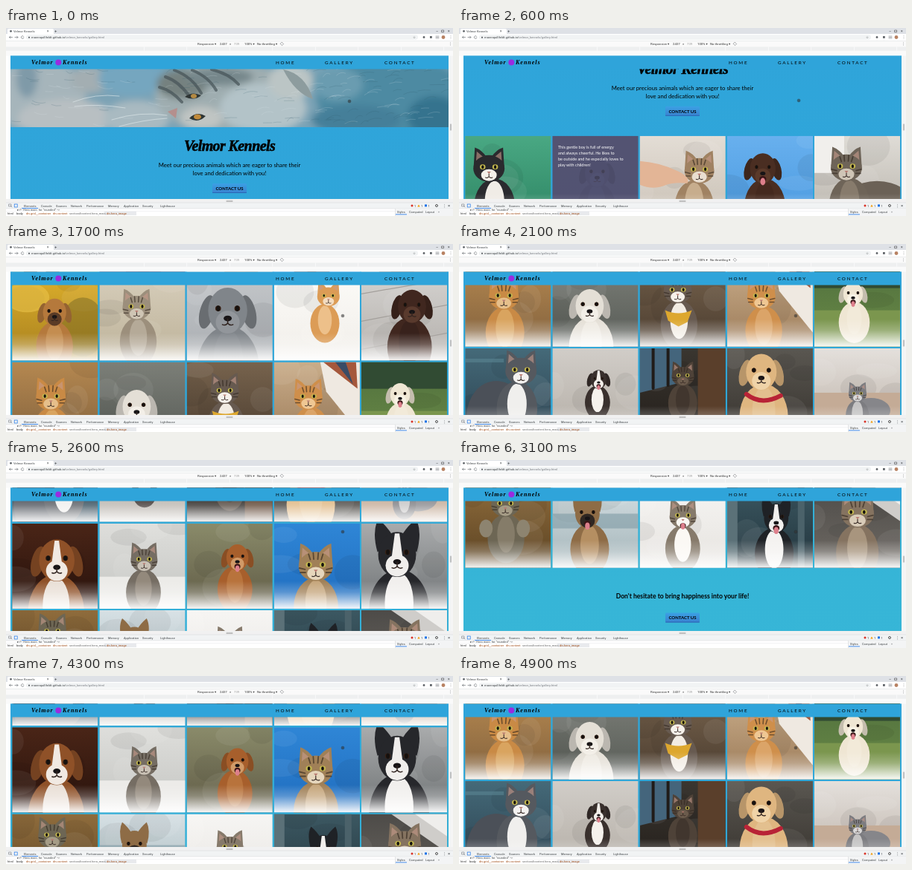
An HTML page for the animation above (5 s loop, 600 px wide and 254 px high).

```html
<!DOCTYPE html>
<html lang="en">
<head>
<meta charset="utf-8">
<title>Velmor Kennels</title>
<style>
html, body { margin: 0; width: 100%; height: 100%; overflow: hidden; background: #fff; }
svg { display: block; width: 600px; height: 254px; }
text { font-family: Lato, sans-serif; white-space: pre; }
.ui { font-family: Roboto, sans-serif; fill: #3c4043; }
.brand { font-family: "Liberation Serif", serif; font-weight: 700; font-style: italic; }
</style>
</head>
<body>
<svg id="stage" viewBox="0 0 600 254"></svg>
<script>
const LOOP = 5000, STEP = 100;
const TOP = 250, PITCH = 117.3, SIZE = 115.2;

// time, scroll offset
const SCROLL = [[0, 0], [400, 80], [500, 80], [1100, 225], [1200, 248], [1300, 257], [1500, 257],
  [2100, 461], [3100, 806], [3500, 830], [3700, 830], [3800, 806], [3900, 776], [4300, 650], [4900, 460]];

// kind letters: c cat, d drop-eared dog, p prick-eared dog, t stripes, b blaze, o open mouth
// then: backdrop top, backdrop bottom, fur, muzzle, chest, x, y, radius
const PETS = `
c 49a883 2f8664 2a2a2e f3f0ea f0ece6 32 44 21
d 5b5c7c 57587a 4c4d6b 55567a 55567a 60 50 20
ct e3ddd5 c9c0b4 a08262 e9ded0 c7ad8d 80 47 20
do 68b0ee 4b9ae0 4a2e22 5b3a2a 44291e 48 44 21
ct dfdcd6 b9b4ac 6e6458 cfc5b6 877b6c 43 43 21
d dcae2b a67f1f b5793c 5a3b26 c48d50 57 50 19
ct d6cdba bdb299 9c8f7c cfc5b4 b5aa98 50 44 19
d c3c6c9 a9adb1 80858a 92969b 858a8f 55 48 32
c fbfaf7 f1eee9 dc9c56 f3dcc0 edc08a 73 29 15
d d3d1ce b3afab 40271f 593a2d 38221c 68 42 23
ct b58850 81613d c98a45 e6bf8b d9a45f 52 48 20
d 7c7f78 565a55 e4dfd6 f3efe8 eeeae2 50 60 23
ct 77634d 4a3c2f 675a50 f6f1ea f2ece3 51 40 19
ct c9ad8a 9b7a58 cf8f4b efc793 dba468 46 48 19
do 50703e 6a8a46 efe6d3 f8f2e4 f2ead9 52 44 16
c 456a79 2c4250 55595f f3f1ef f0efed 75 31 21
dbo d1cdc8 b5afa7 39302d f3efea f5f1ec 62 42 13
ct 3a3630 241f1b 4e4238 6b5b4c 41362e 58 38 15
d 5a5751 38342f dfb680 efd3a8 e3c08f 46 32 25
ct e4e0dc bdb2a8 7c7c80 d9d8d8 c5c4c4 58 62 12
db 4a2517 28120c 8f5128 f1e9e2 e9dfd6 60 50 29
ct dededb c4c5c2 756d63 c9c1b5 93897c 60 50 18
do 8a8b6a 5f5a45 a75f2c d09a68 b8733c 68 46 18
ct 2f86d6 1f6cbe a08057 e6d6bc c5a57b 56 58 23
pb a9abac 6f7375 26272b f0eeec f1efed 48 42 31
ct 8f6c3c 5a4222 6d6654 a59c86 857c69 54 30 19
po d6e0e4 a3b4b8 8e6c46 2f2722 b58f62 47 42 20
cto f6f5f3 e6e3df 867a6b f9f6f1 fbf8f4 58 46 18
pbo 3c5862 22343c 1f2226 f1efed f4f2f0 66 48 20
ct 4d4b48 6f6a64 857360 d8cbb8 a8957e 58 42 22`.trim().split('\n');

const el = (n, a, kids = '') =>
  `<${n} ${Object.entries(a).map(([k, v]) => `${k}="${v}"`).join(' ')}>${kids}</${n}>`;
const rect = (x, y, width, height, fill, more) => el('rect', { x, y, width, height, fill, ...more });
const oval = (cx, cy, rx, ry, fill, more) => el('ellipse', { cx, cy, rx, ry, fill, ...more });
const path = (d, fill, more) => el('path', { d, fill, ...more });
const line = (d, stroke, w = 1, more) =>
  path(d, 'none', { stroke, 'stroke-width': w, 'stroke-linecap': 'round', ...more });
const text = (x, y, size, s, more) => el('text', { x, y, 'font-size': size, ...more }, s);
const ui = (x, y, size, s, more) => text(x, y, size, s, { class: 'ui', ...more });
const fade = (id, stops) => el('linearGradient', { id, x2: 0, y2: 1 },
  stops.map(([offset, c, o = 1]) => el('stop', { offset, 'stop-color': c, 'stop-opacity': o })).join(''));

let seed = 7;
const rnd = () => (seed = seed * 16807 % 2147483647) / 2147483647;

// scenery behind or in front of single pets, keyed by gallery position
const BEHIND = {
  4: rect(0, 0, 40, 50, '#f1efec') + oval(84, 96, 50, 35, '#6b6156'),
  5: oval(20, 30, 30, 20, '#ecc44a', { opacity: .6 }) + oval(95, 70, 30, 40, '#7a6a24', { opacity: .5 }),
  9: line('M0 25L115 5M0 62L115 40M0 100L115 78', '#a39f9b', 1.2),
  13: path('M62 0H115V96L70 40Z', '#efe9e1') + path('M66 0H110L112 36Z', '#a5583c') + path('M82 0H96L106 30Z', '#394c66'),
  14: rect(0, 0, 115, 36, '#314b33') + rect(0, 66, 115, 50, '#7b964e'),
  15: oval(42, 92, 40, 48, '#4b5058') + rect(0, 14, 52, 5, '#5b8593', { opacity: .6 }),
  17: path('M0 0H56V46L0 60Z', '#44657c') + line('M18 0V54M38 0V50', '#201c19', 4) + rect(78, 0, 37, 115, '#5a3f2b'),
  19: rect(0, 60, 115, 55, '#c4ab96') + oval(76, 84, 26, 17, '#86868a'),
  21: rect(0, 72, 115, 43, '#ecebe8'),
  26: rect(0, 42, 115, 20, '#7f9ba6', { opacity: .6 }),
  28: rect(0, 0, 14, 115, '#5b7178') + rect(95, 0, 9, 115, '#4b626a'),
  29: path('M40 0H115V52Z', '#cfcdca') + path('M72 0H115V30Z', '#efeeec')
};
const FRONT = {
  0: oval(24, 104, 15, 8, '#f5f2ed') + oval(62, 103, 17, 8, '#f5f2ed'),
  2: path('M0 34Q28 36 52 48Q68 56 64 64Q46 62 36 66Q18 74 0 66Z', '#e3b596'),
  12: path('M34 66Q52 74 70 66L64 82L52 88L38 80Z', '#dda72e'),
  18: line('M26 62Q46 78 72 64', '#b82336', 6),
  25: oval(28, 62, 9, 12, '#8d8470') + oval(78, 62, 9, 12, '#8d8470')
};

function pet(spec) {
  const [kind, , , ...rest] = spec.split(' ');
  const [fur, snout, chest] = rest.map(c => '#' + c);
  const [x, y, r] = rest.slice(3).map(Number);
  const has = k => kind.includes(k);
  const cat = has('c');
  const both = s => s + el('g', { transform: 'scale(-1 1)' }, s);
  const ear = cat ? path('M-.98 -.1L-.9 -1.35Q-.45 -1.2 -.12 -.7Z', fur) + path('M-.82 -.5L-.78 -1.1L-.38 -.75Z', '#c99b8c', { opacity: .6 })
    : has('p') ? path('M-.85 -.1Q-1.1 -1 -.82 -1.55Q-.4 -1.2 -.15 -.75Z', fur)
    : oval(-.86, .05, .3, .72, fur, { transform: 'rotate(14 -.86 0)' }) + oval(-.86, .05, .3, .72, '#000', { opacity: .18, transform: 'rotate(14 -.86 0)' });
  const eye = oval(-.4, -.1, cat ? .18 : .12, cat ? .16 : .12, cat ? '#c2b64e' : '#3a2114') + oval(-.4, -.1, .08, .12, '#15110f');
  const stripe = line('M-.15 -.8L-.12 -.42M-.42 -.72L-.32 -.4M-.95 .1L-.62 .18M-.9 .36L-.6 .36', '#2d241c', .08, { opacity: .6 });
  const nose = cat ? path('M-.12 .2H.12L0 .34Z', '#b77a70') : oval(0, .32, .17, .12, '#171416');
  const head = [
    both(ear),
    cat ? oval(0, 0, 1, .86, fur) : oval(0, 0, .82, .98, fur),
    has('b') ? path('M-.1 -.92H.1L.26 .3H-.26Z', snout) : '',
    oval(0, cat ? .42 : .48, .5, cat ? .38 : .48, snout),
    both(eye), has('t') ? both(stripe) : '', nose,
    has('o') ? oval(0, .68, .22, .2, '#3a1517') + oval(0, cat ? .72 : .84, .16, .24, '#dd7f8b')
      : line('M0 .34V.52M-.22 .58Q-.1 .64 0 .52Q.1 .64 .22 .58', '#30231f', .05)
  ].join('');
  const bx = x + (57 - x) * .3;
  return oval(bx, y + 2.4 * r, 1.3 * r, 1.75 * r, fur) + oval(bx, y + 2.1 * r, .62 * r, 1.3 * r, chest) +
    el('g', { transform: `translate(${x} ${y}) scale(${r})` }, head);
}

function card(spec, i) {
  const [, a, b] = spec.split(' ');
  const x = 8.2 + i % 5 * 117.2, y = TOP + Math.floor(i / 5) * PITCH;
  let art = fade('bg' + i, [[0, '#' + a], [1, '#' + b]]) + rect(0, 0, SIZE, SIZE, `url(#bg${i})`);
  if (i === 1) {
    const note = ['This gentle boy is full of energy', 'and always cheerful. He likes to', 'be outside and he especially loves to', 'play with children!'];
    art += pet(spec) + rect(0, 0, SIZE, SIZE, '#50516f', { opacity: .75 }) +
      note.map((s, n) => text(7.5, 17.5 + n * 7.8, 5.5, s, { fill: '#fff' })).join('');
  } else {
    for (let n = 0; n < 4; n++)
      art += oval(rnd() * 115, rnd() * 90, 14 + rnd() * 16, 10 + rnd() * 16, n % 2 ? '#fff' : '#000', { opacity: .06 });
    art += (BEHIND[i] || '') + pet(spec) + (FRONT[i] || '');
  }
  art += rect(0, 78, SIZE, SIZE - 78, 'url(#mist)', { opacity: i === 1 ? .6 : 1 });
  return el('g', { transform: `translate(${x} ${y})`, 'clip-path': 'url(#card)' }, art);
}

function hero() {
  const soft = [
    rect(0, 50, 600, 90, '#7ba3b5'),
    oval(45, 92, 62, 50, '#a6b5bb'), oval(80, 122, 64, 26, '#b8bfc2'),
    oval(28, 68, 14, 26, '#7f9aa8'), oval(112, 70, 26, 18, '#a3aeb2'),
    oval(170, 68, 46, 24, '#75a6bf'), oval(175, 122, 44, 24, '#a9bac1'),
    oval(292, 92, 92, 48, '#9fadb0'), oval(236, 76, 34, 20, '#75817f'),
    oval(286, 66, 46, 12, '#76878b'), oval(345, 108, 58, 34, '#b3c3c8'),
    oval(262, 122, 28, 16, '#c0c5c3'), oval(382, 72, 30, 24, '#bbc5c5'),
    oval(520, 94, 104, 54, '#4e8aa2'), oval(445, 76, 34, 22, '#6b9cb0'),
    oval(470, 124, 60, 20, '#457f99'), oval(575, 120, 36, 28, '#35738e')
  ].join('');
  let hair = '';
  for (let n = 0; n < 150; n++) {
    const x = 8 + rnd() * 580, y = 54 + rnd() * 78, dx = 8 + rnd() * 12, dy = (x < 210 ? 6 : -8) * rnd();
    hair += line(`M${x} ${y}q${dx / 2} ${dy} ${dx} ${dy / 2}`, n % 2 ? '#dce6e8' : '#335a6a', .7, { opacity: .28 });
  }
  const face = line('M214 66Q232 72 246 92M226 57Q250 66 262 88M250 57Q272 66 282 84M276 56Q300 62 312 76M206 80Q222 84 236 100', '#465357', 4, { opacity: .7 }) +
    path('M372 56Q402 62 412 96Q388 88 372 56Z', '#8d9c9e') +
    path('M240 93Q250 85 262 91Q253 99 240 93Z', '#2e3534') + oval(252, 92, 4, 3, '#b48a43') +
    path('M246 122Q256 112 268 119Q258 129 246 122Z', '#2e3534') + oval(257, 120, 5, 3.6, '#c18a3b') +
    path('M217 113L230 108L228 122Z', '#b48f8d') +
    line('M216 118Q180 112 142 124M216 122Q184 124 152 133M90 100Q120 88 152 92M92 106Q124 102 160 108', '#e4ecee', .6);
  return el('g', { 'clip-path': 'url(#heroBox)' }, el('g', { filter: 'url(#blur)' }, soft) + hair + face);
}

const mid = { 'text-anchor': 'middle' };
const button = y => rect(277, y, 46, 13, 'url(#btn)', { rx: 1.5 }) + rect(277, y + 12, 46, 1, '#2a64b4', { rx: .5 }) +
  text(300, y + 8.7, 6, 'CONTACT US', { ...mid, 'font-weight': 700 });

const page = () => rect(6, 30, 588, 1100, 'url(#sea)') + hero() +
  text(300, 166, 20, 'Velmor Kennels', { ...mid, class: 'brand', 'letter-spacing': -.6, stroke: '#000', 'stroke-width': .5 }) +
  text(300, 188.4, 7.7, 'Meet our precious animals which are eager to share their', mid) +
  text(300, 199.4, 7.7, 'love and dedication with you!', mid) +
  button(210) + PETS.map(card).join('') +
  text(300, 993.4, 8.6, "Don't hesitate to bring happiness into your life!", { ...mid, 'font-weight': 700 }) +
  button(1012.5);

const nav = () => rect(6, 37.5, 588, 18, '#2fa4da') +
  text(34, 49.3, 8, 'Velmor', { class: 'brand', 'letter-spacing': 1 }) +
  oval(70.3, 46.6, 4, 4, '#9a2be0') +
  text(76, 49.3, 8, 'Kennels', { class: 'brand', 'letter-spacing': 1 }) +
  [[362, 'HOME'], [428, 'GALLERY'], [508, 'CONTACT']]
    .map(([x, s]) => text(x, 48.6, 6.3, s, { 'letter-spacing': 1.75 })).join('');

function browser() {
  let s = rect(0, 0, 600, 8, '#dee1e6') + path('M2 8V2.5Q2 1 4 1H62Q64 1 64 2.5V8Z', '#fff') +
    oval(6.5, 4.3, 1.4, 1.4, '#5f6368') + ui(10, 5.8, 4.1, 'Velmor Kennels') + ui(55, 5.8, 4.5, '×') + ui(65, 6.2, 6, '+') +
    ui(577, 5.8, 5, '–') + line('M585 3h2.6v2.6h-2.6z', '#444', .6) + ui(593, 6, 5, '×') +
    rect(0, 8, 600, 9, '#fff') +
    line('M8.5 12.5H4.5M6 11L4.5 12.5L6 14M12 12.5H16M14.5 11L16 12.5L14.5 14', '#5f6368', .6) +
    line('M23.6 11.4A1.8 1.8 0 1 0 23.9 13', '#5f6368', .6) +
    rect(27, 9.3, 526, 6.6, '#f1f3f4', { rx: 3.3 }) + rect(30, 11.8, 2, 1.8, '#5f6368') +
    ui(34, 14, 4.15, 'marenquillfeldt.github.io/<tspan fill="#777b80">velmor_kennels/gallery.html</tspan>') +
    ui(546, 14.2, 4.5, '☆') + oval(561, 12.5, 1.4, 1.4, '#5f6368') + rect(569, 11, 2.8, 2.8, '#5f6368') +
    line('M577 11h4M577 12.5h4M577 14h4', '#5f6368', .5) + oval(587, 12.5, 2.4, 2.4, '#b88263') + ui(594.5, 14.2, 5, '⋮') +
    rect(0, 17, 600, 20.5, '#fafafa') + rect(0, 17, 600, .4, '#d5d7da');
  s += [[257, 'Responsive ▾'], [287, '2437'], [300, '×'], [306, '739', '#999'], [320, '100% ▾'], [337, 'No throttling ▾']]
    .map(([x, t, c = '#333']) => ui(x, 23, 4.3, t, { style: `fill:${c}` })).join('');
  s += line('M369 20h3v3h-3z', '#5f6368', .5, { transform: 'rotate(45 370.5 21.5)' }) + ui(594, 23, 5, '⋮') +
    rect(0, 25.5, 600, 5.2, '#eeeff0');
  for (let x = 185; x < 600; x += 57.5) s += rect(x, 25.5, .6, 5.2, '#fff');
  s += rect(0, 231, 600, 5, '#f1f1f1') + line('M296 233.3h8M296 234.5h8', '#777', .45) +
    rect(594, 37.5, 6, 193.5, '#f5f5f5') + line('M596.4 130v8M597.6 130v8', '#777', .45);
  return s;
}

function devtools() {
  let s = rect(0, 236, 600, 18, '#fff') + rect(0, 236, 600, 8, '#f1f3f4') + rect(0, 235.8, 600, .4, '#cacdd1') +
    rect(0, 243.8, 600, .4, '#cacdd1') + line('M4 238h3v3h-3zM6 240l2 2', '#5f6368', .5) +
    rect(11.2, 238, 4, 4, 'none', { stroke: '#1a73e8', 'stroke-width': .7 }) + rect(21, 243.2, 22, .8, '#1a73e8');
  s += [[24, 'Elements'], [47, 'Console'], [67, 'Sources'], [87, 'Network'], [108, 'Performance'], [137, 'Memory'],
    [158, 'Application'], [183, 'Security'], [207, 'Lighthouse']].map(([x, t]) => ui(x, 241.6, 4, t)).join('');
  s += oval(545, 240, 1.5, 1.5, '#d93025') + ui(548, 241.6, 4, '1') +
    path('M552.3 241.5l1.7 -3l1.7 3z', '#f29900') + ui(557, 241.6, 4, '1') +
    rect(562, 238.4, 3, 3, '#1a73e8') + ui(566.5, 241.6, 4, '1') +
    oval(578, 240, 1.5, 1.5, 'none', { stroke: '#444', 'stroke-width': .9 }) + ui(586, 242, 5.5, '⋮') + ui(593, 242.2, 6, '×') +
    el('g', { 'clip-path': 'url(#code)' }, ui(15, 246.5, 4, '▸&lt;!-- Hero main  for "rounded" --&gt;', { style: 'font-family:"Liberation Mono",monospace;fill:#33479b' })) +
    rect(0, 247.2, 522, .3, '#d5d7da') + rect(132, 247.7, 43, 5.3, '#e8eaed');
  s += [[2, 'html', '#333'], [14, 'body', '#222'], [27, 'div.grid__container', '#a04a13'], [63, 'div.content', '#a04a13'],
    [85, 'section#content.hero_main', '#666'], [135, 'div.hero_image', '#a04a13']]
    .map(([x, t, c]) => ui(x, 251.5, 4, t, { style: `fill:${c}` })).join('');
  s += rect(522, 244, 78, 10, '#f3f4f5') + rect(522, 244, .4, 10, '#cacdd1') + rect(523, 251.5, 15, .8, '#1a73e8');
  return s + [[525, 'Styles'], [541, 'Computed'], [563, 'Layout'], [580, '»']].map(([x, t]) => ui(x, 249.5, 4, t)).join('');
}

const clip = (id, ...box) => el('clipPath', { id }, rect(...box));
const stage = document.getElementById('stage');
stage.innerHTML = el('defs', {},
  clip('view', 6, 37.5, 588, 193.5) + clip('heroBox', 6, 55, 588, 79) + clip('card', 0, 0, SIZE, SIZE) + clip('code', 0, 244, 520, 3) +
  el('filter', { id: 'blur', x: '-5%', y: '-20%', width: '110%', height: '140%' }, '<feGaussianBlur stdDeviation="5"/>') +
  fade('sea', [[0, '#2fa4da'], [.6, '#30a8d9'], [.85, '#36b5d7'], [1, '#37b6d7']]) +
  fade('mist', [[0, '#fff', 0], [.4, '#fff', .25], [1, '#fff', .95]]) +
  fade('btn', [[0, '#3ba0e4'], [1, '#3a82d0']])) +
  rect(0, 0, 600, 254, '#fff') + browser() +
  el('g', { 'clip-path': 'url(#view)' }, el('g', { id: 'page' }, page()) + nav()) + devtools() +
  oval(0, 0, 2, 2, '#333', { id: 'touch', opacity: .6, stroke: '#222', 'stroke-width': .5 });

const pageEl = document.getElementById('page'), touch = document.getElementById('touch');

function scrollAt(t) {
  const i = SCROLL.findIndex(k => k[0] > t);
  if (i < 0) return SCROLL[SCROLL.length - 1][1];
  const [t0, a] = SCROLL[i - 1], [t1, b] = SCROLL[i];
  return a + (b - a) * (t - t0) / (t1 - t0);
}

let last = -1;
function draw() {
  const t = Math.floor(performance.now() % LOOP / STEP) * STEP;
  if (t !== last) {
    last = t;
    pageEl.setAttribute('transform', `translate(0 ${-scrollAt(t)})`);
    const k = Math.min(1, t / 1100);
    touch.setAttribute('transform', `translate(${461 - 9 * k} ${99 - 2 * k})`);
    }
  requestAnimationFrame(draw);
}
draw();
</script>
</body>
</html>
```
